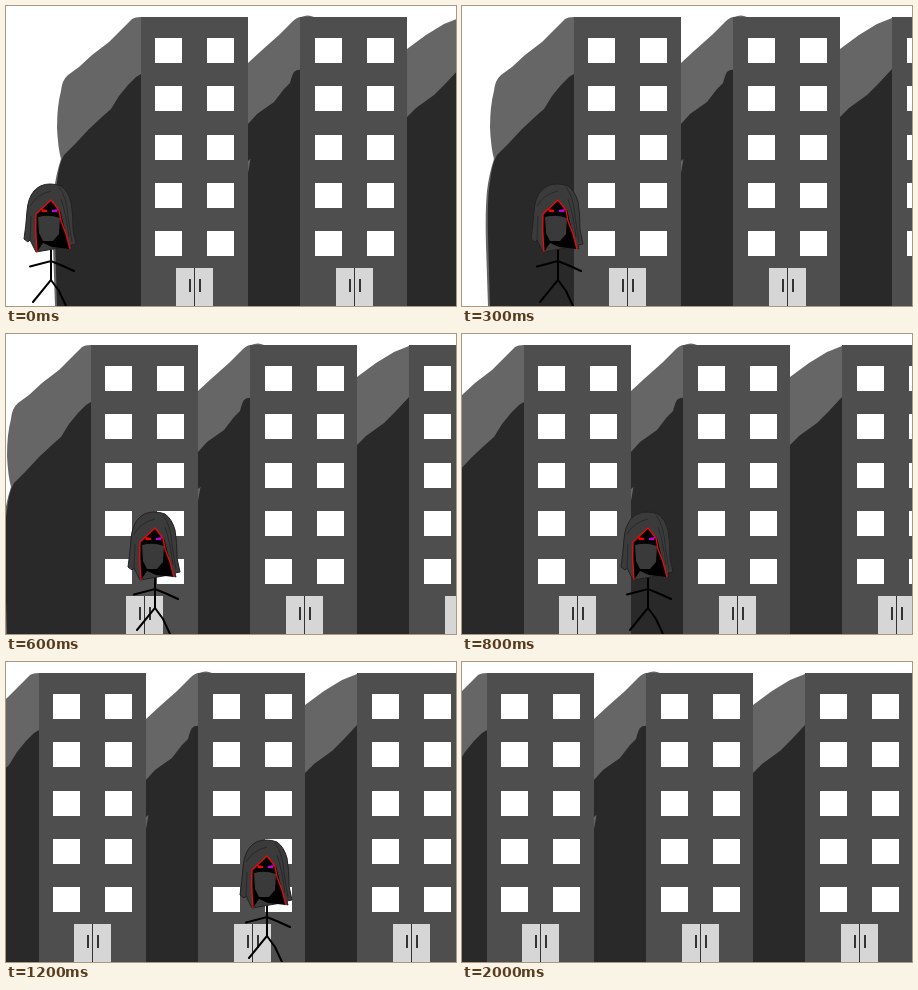
Animation of 450 by 300 pixels, one loop 2100 ms. Source, as an HTML page:

```html
<!DOCTYPE html>
<html lang="en">
<head>
<meta charset="utf-8">
<title>Into the shadows</title>
<style>
  html, body { margin: 0; width: 100%; height: 100%; overflow: hidden; background: #fff; }
  svg { display: block; width: 450px; height: 300px; }
  .far { fill: #666; }
  .near { fill: #292929; }
  .pane { fill: #fff; }
  .wall { fill: #4e4e4e; }
  .door { fill: #d6d6d6; }
  .bar { fill: #333; }
  .limbs { fill: none; stroke: #000; stroke-width: 2; stroke-linecap: round; }
  .hood { fill: #3b3b3b; stroke: #222; stroke-width: 1; stroke-linejoin: round; }
  .fold { fill: none; stroke: #292929; stroke-width: 1; }
  .trim { fill: none; stroke: #e00d0d; stroke-width: 1.4; stroke-linejoin: round; }
</style>
</head>
<body>
<svg viewBox="0 0 450 300">
  <g id="city">
    <!-- x is measured from the left wall of the first building -->
    <path class="far" d="M0 11Q-6 11-9 13L-20 24-32 36-49 49-62 61-73 69Q-79 74-80 85Q-84 100-84 122Q-83 142-80 153Q-85 168-87 185Q-89 205-88 240L-86 300H0Z"/>
    <path class="near" d="M0 68L-5 71-13 79-22 90-30 103-38 110-52 123-65 137-77 149Q-82 157-84 176Q-87 192-86 230L-84 300H0Z"/>
    <path class="far" d="M107 57L120 45 138 29 151 16Q156 11 160 11Q167 8 173 11V300H107Z"/>
    <path class="near" d="M107 118L116 108 133 96 143 83 149 77Q151 69 153 66Q156 63 161 64V300H107V167L109.500 153 107 155Z"/>
    <path class="far" d="M266 43L285 29 303 18 318 12V300H266Z"/>
    <path class="near" d="M266 111L275 102 293 89 305 77 318 63V300H266Z"/>
  </g>
  <g id="walker">
    <!-- x is measured from the spine -->
    <g id="body">
      <path class="limbs" d="M0 238V274L-18 296M0 274L8 285 15 300M-21 260.500L0 255 12 260 23 265"/>
      <path class="hood" d="M-1 178Q-11 178-17 185Q-23 192-24 205Q-25 220-27 233L-23 236-21 234-15 246 14 241 21 243 20 239 25 238 22 224Q22 207 20 196Q17 185 10 180Q5 178-1 178Z"/>
      <path class="fold" d="M-21 200Q-14 188 0 185M8 181Q16 192 17 211L21 236M-20 210L-21 234M10 193Q15 207 18 231"/>
      <path d="M0 194L-15 208-14 246-8 237 1 241 19 243 15 228 9 204Z"/>
      <path d="M-13 211Q-2 208 9 212L8 228 2 235H-8L-12 227Z" fill="#3a3a3a"/>
    </g>
    <g id="glow">
      <path class="trim" d="M-14 246L-15.500 225-15 208 0 194 8 204 10 215 15 228 19 243"/>
      <path d="M-10 203L-4 204V206H-9Z" fill="#f00"/>
      <path d="M1 204L7 203 6 206H1Z" fill="#c000e0"/>
    </g>
  </g>
</svg>
<script>
const STEP = 100, COUNT = 21;
const $ = id => document.getElementById(id);

// [step, value] pairs, linear in between
const cityX = [[0, 135], [3, 112], [6, 85], [8, 62], [12, 33], [13, 25]];
const walkerX = [[0, 45], [3, 96], [6, 149], [8, 186], [12, 261], [15, 317]];
const bodyFade = [[16, 1], [18, 0]];
const glowFade = [[18, 1], [20, 0]];

function at(keys, n) {
  if (n <= keys[0][0]) return keys[0][1];
  for (let i = 1; i < keys.length; i++) {
    const [a, from] = keys[i - 1], [b, to] = keys[i];
    if (n <= b) return from + (to - from) * (n - a) / (b - a);
  }
  return keys[keys.length - 1][1];
}

function rect(cls, x, y, width, height) {
  const el = document.createElementNS('http://www.w3.org/2000/svg', 'rect');
  el.setAttribute('class', cls);
  Object.entries({ x, y, width, height }).forEach(([k, v]) => el.setAttribute(k, v));
  $('city').append(el);
}

function building(x, inset) {
  rect('wall', x, 11, 107, 289);
  for (let row = 0; row < 5; row++)
    for (const col of [14, 66])
      rect('pane', x + inset + col, Math.round(32 + row * 48.3), 27, 25);
  const door = x + inset + 35;
  rect('door', door, 262, 37, 38);
  rect('bar', door + 18, 262, 1, 38);
  rect('bar', door + 13, 273, 2, 13);
  rect('bar', door + 23, 273, 2, 13);
}

building(0, 0);
building(159, 1);
building(318, 1);

const shift = (id, x) => $(id).setAttribute('transform', `translate(${Math.round(x)} 0)`);
const start = performance.now();

function draw() {
  const n = Math.floor(Math.max(0, performance.now() - start) / STEP) % COUNT;
  shift('city', at(cityX, n));
  shift('walker', at(walkerX, n));
  $('body').setAttribute('opacity', at(bodyFade, n));
  $('glow').setAttribute('opacity', at(glowFade, n));
  requestAnimationFrame(draw);
}
draw();
</script>
</body>
</html>
```
